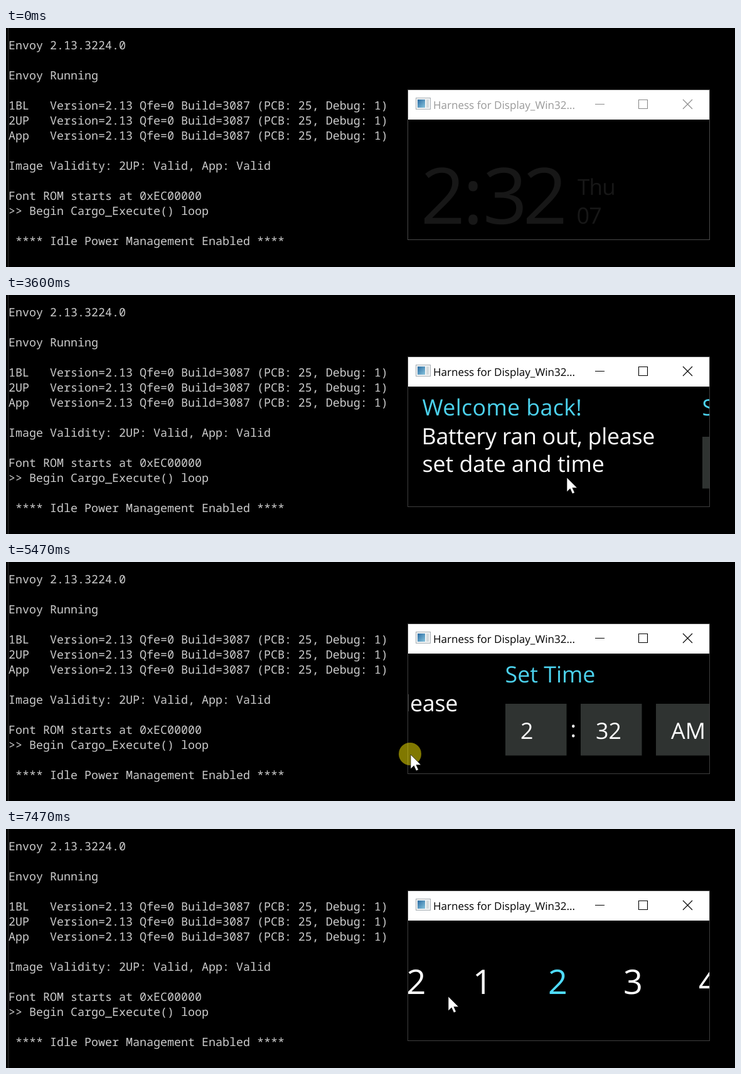
Write an HTML page that moves like this. It is 1162 px wide and 381 px high and loops after 8 s.

```html
<!DOCTYPE html>
<html lang="en">
<head>
<meta charset="utf-8">
<title>Console and display harness</title>
<style>
  html, body { margin: 0; width: 100%; height: 100%; overflow: hidden; background: #000; }
  svg { display: block; width: 100%; height: 100%; }
  text { white-space: pre; text-rendering: geometricPrecision; font-family: "Open Sans", "Noto Sans", sans-serif; }
  #console text { font: 500 18.33px "Noto Sans Mono", "DejaVu Sans Mono", monospace; fill: #ccc; }
  #caption { font-size: 17.05px; }
  #buttons { fill: none; stroke-width: 1.1; }
  #clock { fill: #171717; font-weight: 400; }
  #pages { font-size: 35.8px; fill: #fff; }
  #pages .head { fill: #4cd2ee; }
  #picker { font-size: 54px; font-weight: 500; letter-spacing: -2px; fill: #fff; text-anchor: middle; }
</style>
</head>
<body>
<svg viewBox="0 0 1162 381" preserveAspectRatio="none">
  <defs>
    <clipPath id="screen"><rect x="641" y="147" width="480" height="190"/></clipPath>
    <linearGradient id="blue" x2="1" y2="1">
      <stop offset="0" stop-color="#2b6ca3"/><stop offset="1" stop-color="#86c3dc"/>
    </linearGradient>
  </defs>
  <rect width="1162" height="381"/>
  <path d="M3.5 0V381" stroke="#333"/>
  <g id="console"></g>

  <rect id="frame" x="640.5" y="98.5" width="481" height="239"/>
  <rect x="641" y="99" width="480" height="47" fill="#fff"/>
  <g>
    <rect x="653.5" y="111.5" width="23" height="18" fill="#f1f3f4" stroke="#a9b0b5"/>
    <rect x="656" y="114" width="12" height="13" fill="url(#blue)"/>
    <rect x="670" y="114" width="4" height="13" fill="#d3d9dc"/>
  </g>
  <text id="caption" x="681" y="129">Harness for Display_Win32...</text>
  <path id="buttons" d="M939 121.5H954M1008.5 114.5H1022.5V128.5H1008.5ZM1079 114L1094 129M1094 114L1079 129"/>

  <g clip-path="url(#screen)">
    <g id="clock">
      <text x="661 728 760 824" y="312" font-size="124">2:32</text>
      <text x="911" y="266" font-size="35" letter-spacing="-.8">Thu</text>
      <text x="909.5" y="312" font-size="36" letter-spacing="-.8">07</text>
    </g>
    <g id="pages">
      <text class="head" x="663.5" y="192" letter-spacing=".35">Welcome back!</text>
      <text x="662.5" y="238" letter-spacing="-.28">Battery ran out, please</text>
      <text x="663.5" y="281.5" letter-spacing="-.05">set date and time</text>
      <g id="setTime" transform="translate(430)">
        <text class="head" x="679.5" y="192">Set Time</text>
        <text x="783.5" y="279">:</text>
      </g>
    </g>
    <g id="picker"></g>
  </g>

  <circle id="press" r="18" fill="#fff000" fill-opacity=".5"/>
  <path id="cursor" d="M0 0V22.8L5.2 17.8L8.8 25.8L12.4 24.2L8.9 16.4H16.4Z" fill="#fff" stroke="#000" stroke-width=".6"/>
</svg>
<script>
const LOOP = 8000, PAGE = 430, GRAB = 959;
const $ = id => document.getElementById(id);

function add(parent, tag, attrs, content = "") {
  const node = document.createElementNS("http://www.w3.org/2000/svg", tag);
  for (const key in attrs) node.setAttribute(key, attrs[key]);
  node.textContent = content;
  return parent.appendChild(node);
}

const version = "Version=2.13 Qfe=0 Build=3087 (PCB: 25, Debug: 1)";
[
  "Envoy 2.13.3224.0", "",
  "Envoy Running", "",
  "1BL   " + version,
  "2UP   " + version,
  "App   " + version, "",
  "Image Validity: 2UP: Valid, App: Valid", "",
  "Font ROM starts at 0xEC00000",
  ">> Begin Cargo_Execute() loop", "",
  " **** Idle Power Management Enabled ****"
].forEach((line, i) => line && add($("console"), "text", { x: 4, y: 34 + 24 * i }, line));

["2", "32", "AM"].forEach((label, i) => {
  const x = 680 + 120 * i;
  add($("setTime"), "rect", { x, y: 226, width: 97.5, height: 82.5, fill: "#2f3331" });
  add($("setTime"), "text", { x: x + 24, y: 281.5 }, label);
});

["12", "1", "2", "3", "4"].forEach((label, i) =>
  add($("picker"), "text", { x: 638.5 + 120 * i, y: 262.5, fill: i === 2 ? "#4fdcff" : "#fff" }, label));

// Cursor moves: start, end, number of steps, target x, target y
const moves = [
  [660, 1000, 5, 943, 309],
  [1230, 1400, 3, 920, 274],
  [2430, 2730, 5, 905, 273],
  [2900, 2900, 1, 905, 274],
  [3070, 3140, 2, 894, 290],
  [3600, 3600, 1, 894, 291],
  [3700, 4180, 7, 958, 315],
  [4350, 4490, 3, 901, 321],
  [4590, 4900, 5, 735, 314],
  [5230, 5470, 4, 645, 307],
  [5700, 5767, 2, 634, 304],
  [5834, 6170, 6, 877, 334],
  [6270, 6410, 2, 850, 305],
  [6510, 6900, 6, 705, 267]
];
const presses = [[1570, 1700], [4350, 5834], [6980, 7230]];

// Progress in n jumps: the first at start, the last at end
function stepped(t, start, end, n) {
  if (t < start) return 0;
  if (t >= end) return 1;
  return (Math.floor((t - start) / (end - start) * (n - 1)) + 1) / n;
}

function cursorAt(t) {
  let x = 1010, y = 381;
  for (const [start, end, n, tx, ty] of moves) {
    const p = stepped(t, start, end, n);
    x += (tx - x) * p;
    y += (ty - y) * p;
    if (p < 1) break;
  }
  return [Math.round(x), Math.round(y)];
}

function scrollAt(t) {
  if (t < 4350) return 0;
  if (t < 5834) return cursorAt(t)[0] - GRAB;
  const from = cursorAt(5833)[0] - GRAB;
  const ease = 1 - (1 - stepped(t, 5834, 6170, 6)) ** 2;
  return Math.round(from + (-PAGE - from) * ease);
}

const show = (id, on) => $(id).setAttribute("visibility", on ? "visible" : "hidden");
const move = (id, x, y) => $(id).setAttribute("transform", `translate(${x} ${y})`);

function draw(t) {
  const active = t >= 1570;
  $("frame").setAttribute("stroke", active ? "#3e3e3e" : "#484848");
  $("caption").setAttribute("fill", active ? "#000" : "#999");
  $("buttons").setAttribute("stroke", active ? "#000" : "#8a8a8a");

  show("clock", t < 2430);
  show("pages", t >= 2430);
  move("pages", scrollAt(t), 0);

  const swap = stepped(t, 7330, 7470, 3);
  $("pages").setAttribute("opacity", 1 - swap);
  $("picker").setAttribute("opacity", swap);

  const [x, y] = cursorAt(t);
  show("cursor", t >= 660);
  move("cursor", x, y);
  show("press", presses.some(([from, to]) => t >= from && t < to));
  move("press", x - 1, y - 1);
}

const begin = performance.now();
function tick() {
  draw((performance.now() - begin) % LOOP);
  requestAnimationFrame(tick);
}
tick();
</script>
</body>
</html>
```
